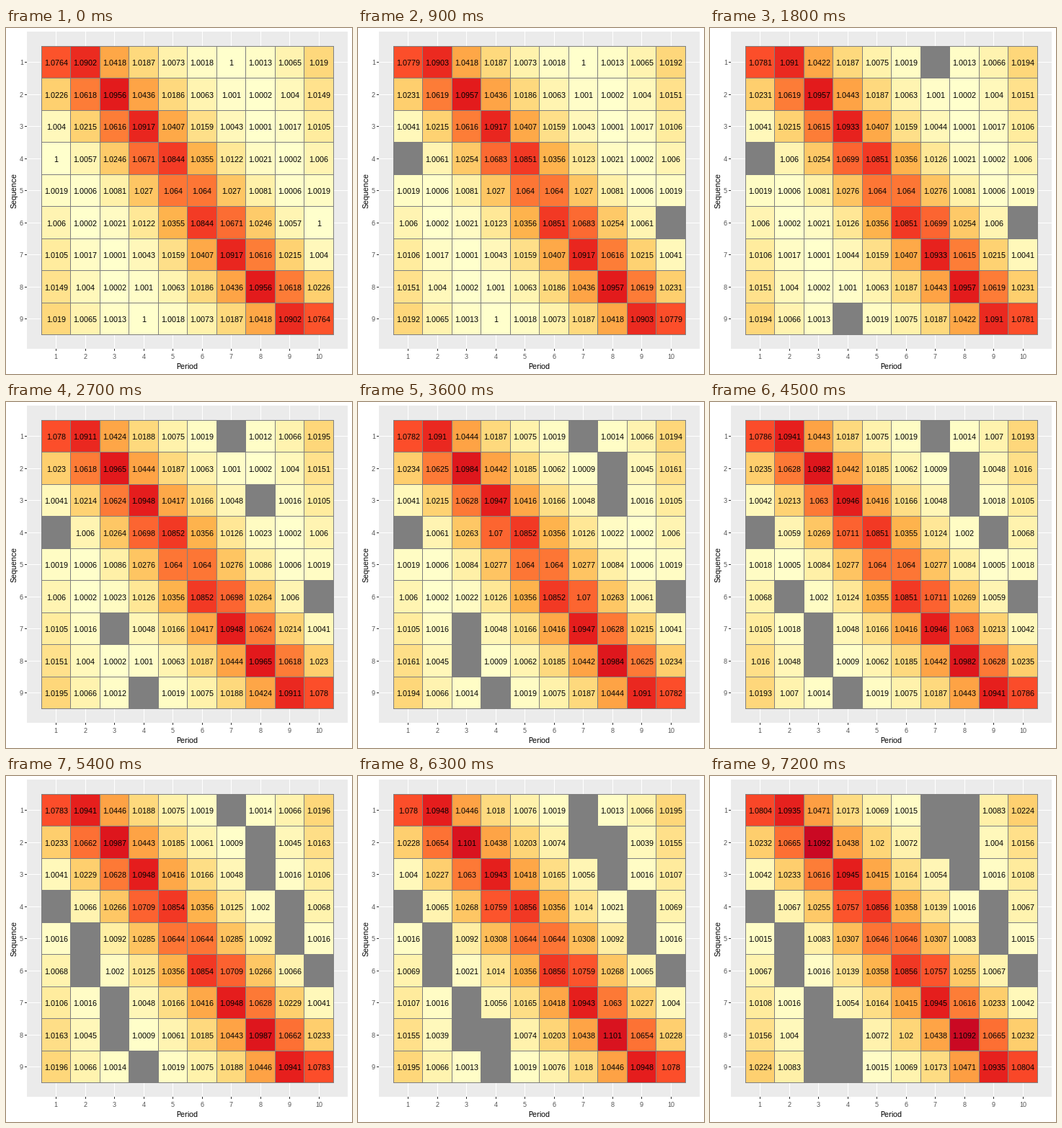
Recreate the animation shown at these times as a matplotlib script. Size 480 by 480 pixels, loop 8 s.

```python
import matplotlib.pyplot as plt
import numpy as np
from matplotlib.animation import FuncAnimation
from matplotlib.colors import LinearSegmentedColormap
from matplotlib.patches import Rectangle

SIZE, DPI = 480, 80
ROWS, COLS = 9, 10
TICK_MS, HOLD, STEPS = 100, 9, 9
GREY = "#7f7f7f"
plt.rcParams.update({"font.family": "Liberation Sans",
                     "text.hinting": "native", "text.hinting_factor": 1})

# Stepped wedge trial: subjects per cell, correlation within a cell,
# and its decay from one period to the next
SUBJECTS, ICC, DECAY = 100, 0.01, 0.95

STOPS = [(0, "#ffffcc"), (0.01, "#ffeda0"), (0.0215, "#fed272"), (0.036, "#feb24c"),
         (0.056, "#fd8d3c"), (0.078, "#fc4e2a"), (0.096, "#e31a1c"), (0.116, "#bd0026")]
TOP = STOPS[-1][0]
HEAT = LinearSegmentedColormap.from_list("heat", [(v / TOP, c) for v, c in STOPS], N=1024)

lag = np.abs(np.subtract.outer(np.arange(COLS), np.arange(COLS)))
COVARIANCE = np.kron(np.eye(ROWS), ICC * DECAY ** lag + (1 - ICC) / SUBJECTS * np.eye(COLS))
PERIODS = np.tile(np.eye(COLS), (ROWS, 1))
TREATED = (np.arange(COLS) > np.arange(ROWS)[:, None]).astype(float).ravel()


def variance_ratios(kept):
    """Growth of the effect's variance when a cell and its mirror are left out."""
    index = np.flatnonzero(kept)
    weight = np.linalg.inv(COVARIANCE[np.ix_(index, index)])
    period = PERIODS[index]
    cross = weight @ period
    proj = weight - cross @ np.linalg.solve(period.T @ cross, cross.T)
    score = proj @ TREATED[index]
    info = score @ TREATED[index]
    ratios = np.full(kept.size, np.nan)
    for i, cell in enumerate(index):
        pair = [i, len(index) - 1 - i]
        loss = score[pair] @ np.linalg.solve(proj[np.ix_(pair, pair)], score[pair])
        ratios[cell] = info / (info - loss)
    return ratios


def thin_out():
    """One grid per step; the least informative pair goes each time."""
    kept = np.ones(ROWS * COLS, bool)
    grids = []
    for _ in range(STEPS):
        grids.append(variance_ratios(kept))
        least = np.nanargmin(grids[-1])
        kept[[least, kept.size - 1 - least]] = False
    return grids


GRIDS = thin_out()

fig = plt.figure(figsize=(SIZE / DPI, SIZE / DPI), dpi=DPI, facecolor="white")
ax = fig.add_axes([0, 0, 1, 1])
ax.set_xlim(0, SIZE)
ax.set_ylim(SIZE, 0)
ax.axis("off")


def box(x0, y0, x1, y1, color, z=1):
    patch = Rectangle((x0, y0), x1 - x0, y1 - y0, facecolor=color,
                      linewidth=0, antialiased=False, zorder=z)
    return ax.add_patch(patch)


def label(x, y, text, px=11, color="black", **kw):
    return ax.text(x, y, text, fontsize=px * 72 / DPI, color=color, zorder=5,
                   **{"ha": "center", "va": "baseline", **kw})


def x_at(i):
    return 49.1 + 40.5 * i


def y_at(i):
    return 25.15 + 44.49 * i


x_edges = [int(x_at(i)) for i in range(COLS + 1)]
y_edges = [int(y_at(i)) for i in range(ROWS + 1)]
x_mids = [round(x_at(i + 0.5)) for i in range(COLS)]
y_mids = [round(y_at(i + 0.5)) for i in range(ROWS)]

# Panel, grid lines, ticks and axis labels
box(29, 5, 474, 445, "#ebebeb", 0)
for i, x in enumerate(x_mids):
    box(x, 5, x + 1, 445, "white")
    box(x, 445, x + 1, 448, "#333333")
    label(x, 459, str(i + 1), 9, "#4d4d4d")
for i, y in enumerate(y_mids):
    box(29, y, 474, y + 1, "white")
    box(26, y, 29, y + 1, "#333333")
    label(24, y + 4, str(i + 1), 9, "#4d4d4d", ha="right")
label(251, 473, "Period")
label(15, 225, "Sequence", rotation=90, rotation_mode="anchor")

# Cells and their borders
cells, numbers = [], []
for r in range(ROWS):
    for c in range(COLS):
        cells.append(box(x_edges[c], y_edges[r], x_edges[c + 1], y_edges[r + 1], GREY, 2))
        numbers.append(label(x_at(c + 0.5), y_mids[r] + 5, ""))
for x in x_edges:
    box(x, y_edges[0], x + 1, y_edges[-1] + 1, GREY, 3)
for y in y_edges:
    box(x_edges[0], y, x_edges[-1] + 1, y + 1, GREY, 3)


def update(frame):
    for cell, number, value in zip(cells, numbers, GRIDS[frame // HOLD]):
        gone = np.isnan(value)
        cell.set_facecolor(GREY if gone else HEAT((value - 1) / TOP))
        number.set_text("" if gone else f"{value:.4f}".rstrip("0").rstrip("."))
    return cells + numbers


anim = FuncAnimation(fig, update, frames=80, interval=TICK_MS,
                     repeat=True, repeat_delay=0, blit=False)
plt.show()
```
